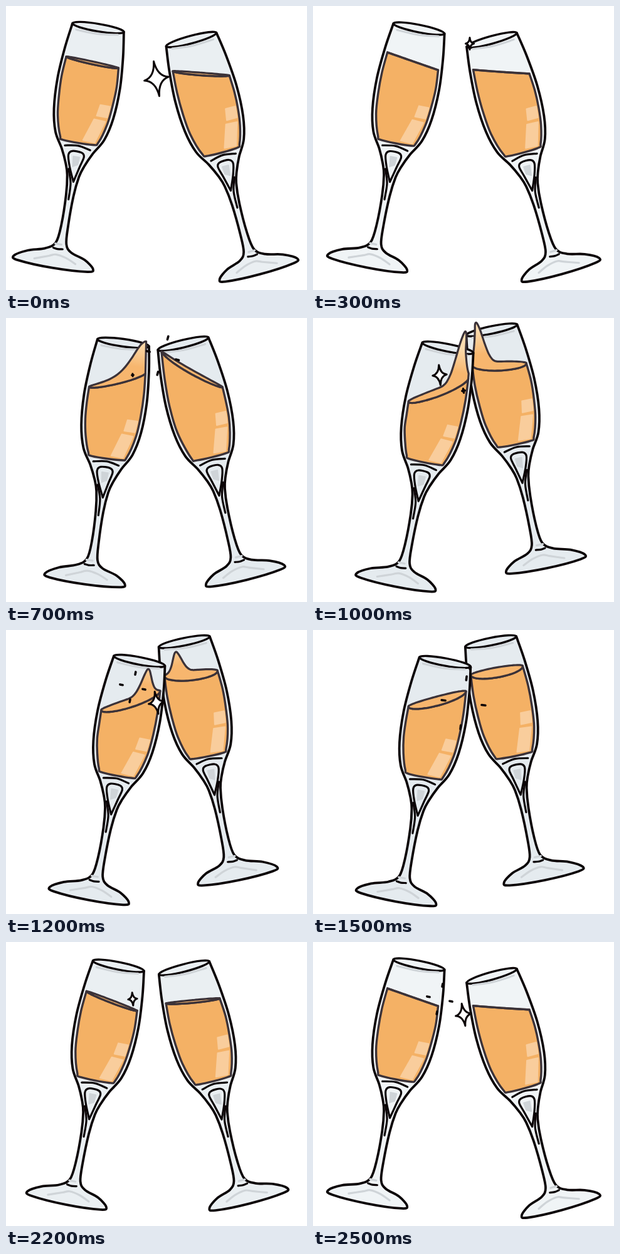
Write an HTML page with a canvas that moves like this. It is 480 px wide and 453 px high and loops after 2600 ms.

```html
<!DOCTYPE html>
<html lang="en">
<head>
<meta charset="utf-8">
<title>Cheers</title>
<style>
html, body { margin: 0; width: 100%; height: 100%; overflow: hidden; background: #fff; }
canvas { display: block; width: 480px; height: 453px; }
</style>
</head>
<body>
<canvas id="stage" width="480" height="453"></canvas>
<script>
const ctx = document.getElementById('stage').getContext('2d');
const LOOP = 2600, HOLD = 200, TICK = 100;
const INK = '#0b0406', EDGE = '#3b3238', GREY = '#cfd4d8';
const ORANGE = '#f4b165', FOAM = '#f7b66e', PALE = '#fbdcb0', SHINE = '#f9cd9c';

const mix = (a, b, u) => a + (b - a) * u;
const clamp = (v, lo = 0, hi = 1) => Math.min(hi, Math.max(lo, v));

// One glass serves both sides: rim centre at 0,0, stem along +y,
// +x towards the other glass. Key points of the profile: [y, half width].
const PROFILE = [[0, 41.5], [40, 47], [90, 50.5], [139, 48], [175, 39.5], [200, 25], [222, 15],
  [240, 9.5], [272, 6], [320, 5.5], [349, 8.5], [361, 21], [369, 46], [381, 64], [387, 56]];
const FLOOR = 186, INSET = 5.5;

function halfWidth(y) {
  const i = clamp(PROFILE.findIndex(p => p[0] > y), 1, PROFILE.length - 1);
  const [a, b] = [PROFILE[i - 1], PROFILE[i]];
  return mix(a[1], b[1], clamp((y - a[0]) / (b[0] - a[0])));
}

// Poses: rim x, rim y, lean in degrees, liquid level, liquid tilt, splash height.
const BEATS = [0, 1, 3, 5, 7, 9, 12];
const glasses = [
  { side: -1, poses: [
    [295.5, 53.5, 15.1, 56, 15, 0], [285, 54, 15.5, 53, 15, 0], [282.5, 41, 13.8, 43, 39, 0],
    [285, 19, 11.8, 56, 7, 65], [283.5, 18.5, 11.5, 47, 1, 0], [282, 16, 12.2, 57, -10, 0]] },
  { side: 1, poses: [
    [147, 34.5, 9.6, 56, -2, 0], [169, 36, 11.2, 53, -6, 0], [187, 39.5, 8, 60, 17, 50],
    [215, 47.5, 11.3, 69, 27, 80], [210.5, 51, 10.5, 60, 20, 0], [200, 42, 11.4, 65, -10, 0]] }
];
for (const g of glasses) g.poses.push(g.poses[1]);

function poseAt(g, n) {
  const i = clamp(BEATS.findIndex(b => b > n), 1, BEATS.length - 1) || 1;
  const last = n >= BEATS[BEATS.length - 1] ? BEATS.length - 1 : i;
  const u = (n - BEATS[last - 1]) / (BEATS[last] - BEATS[last - 1]);
  return g.poses[last - 1].map((v, k) => mix(v, g.poses[last][k], u));
}

// Smooth curve through points, continuing the current path when joined.
function trace(p, joined) {
  if (joined) ctx.lineTo(...p[0]); else ctx.moveTo(...p[0]);
  for (let i = 0; i < p.length - 1; i++) {
    const a = p[i - 1] || p[i], b = p[i], c = p[i + 1], d = p[i + 2] || c;
    ctx.bezierCurveTo(b[0] + (c[0] - a[0]) / 6, b[1] + (c[1] - a[1]) / 6,
      c[0] - (d[0] - b[0]) / 6, c[1] - (d[1] - b[1]) / 6, c[0], c[1]);
  }
}

function paint(fill, stroke, width) {
  if (fill) { ctx.fillStyle = fill; ctx.fill(); }
  if (stroke) { ctx.strokeStyle = stroke; ctx.lineWidth = width; ctx.stroke(); }
}

function line(color, ...p) {
  ctx.beginPath(); trace(p); paint(null, color, 3.2);
}

function block(fill, ...p) {
  ctx.beginPath(); p.forEach(q => ctx.lineTo(...q)); ctx.closePath();
  paint(fill, fill, 2);
}

function drawBody(tint) {
  // the foot sits a little off the stem
  const wall = dir => PROFILE.map(([y, w]) => [dir * w - 8 * clamp((y - 345) / 35), y]);
  ctx.beginPath();
  trace([...wall(-1), [-8, 390], ...wall(1).reverse()]);
  paint(tint, INK, 3.8);
  ctx.beginPath(); ctx.ellipse(0, 0, 41.5, 6, 0, 0, 7); paint(tint, INK, 3.4);

  line(GREY, [-34, 9], [0, 10], [33, 6]);
  line(GREY, [-10, 351], [0, 351]);
  line(GREY, [-39, 380], [-17, 372], [-6, 368], [11, 371], [27, 378]);
  block(GREY, [-5, 209], [5, 209], [4, 221], [-3, 225]);
  line(INK, [-21, 194], [0, 191], [20, 195]);
  line(INK, [2, 249], [-8, 226], [-13, 208], [-8, 201], [7, 201], [12, 207], [8, 224], [2, 249]);
  line(INK, [-9, 230], [-2, 252], [-1, 278]);
  line(INK, [-12, 358], [-5, 359], [3, 358]);
}

function drawLiquid(n, wave, level, tilt, splash) {
  // the splash starts wide at the inner wall, then narrows and moves away from it
  const peak = clamp(1 - 0.19 * (n - 3), 0.4, 1), width = clamp(0.75 - 0.25 * (n - 3), 0.25, 0.75);
  const edge = bend => Array.from({ length: 31 }, (_, i) => {
    const s = -Math.cos(i / 30 * Math.PI), y = level - tilt * s + bend(s);
    return [s * (halfWidth(Math.max(y, 0)) - INSET), y];
  });
  const bow = s => 16 * wave * Math.sqrt(1 - s * s);
  const front = edge(s => 0.7 * bow(s)).reverse();
  const back = edge(s => -0.3 * bow(s) - splash * Math.exp(-(((s - peak) / width) ** 2)));

  const wall = (dir, top) => [0, 0.25, 0.5, 0.75, 1].map(u => {
    const y = mix(top, FLOOR - 6, u);
    return [dir * (halfWidth(y) - INSET), y];
  });
  ctx.beginPath();
  trace([...wall(-1, level + tilt), [-24, FLOOR], [22, FLOOR], ...wall(1, level - tilt).reverse()]);
  trace(front, true);
  ctx.closePath(); paint(ORANGE, EDGE, 3.4);

  const foam = ctx.createLinearGradient(0, 35, 0, -5);
  foam.addColorStop(0, FOAM);
  foam.addColorStop(1, PALE);
  ctx.beginPath();
  trace(back); trace(front, true);
  ctx.closePath(); paint(foam, EDGE, 3.2);
}

function drawGlass(g, n) {
  const [x, y, lean, level, tilt, splash] = poseAt(g, n);
  const wave = Math.abs(Math.sin(Math.PI * (n - 1) / 11)), shade = clamp(2 * wave);
  const tint = `rgb(${mix(240, 229, shade)}, ${mix(244, 235, shade)}, ${mix(246, 239, shade)})`;
  ctx.save();
  ctx.translate(x, y);
  ctx.rotate(g.side * lean * Math.PI / 180);
  ctx.scale(g.side, 1);
  drawBody(tint);
  drawLiquid(n, wave, level, tilt, splash);
  ctx.scale(g.side, 1); // light always falls from the right
  block(SHINE, [24, 121], [40, 121], [38, 139], [21, 139]);
  block(SHINE, [18, 145], [36, 146], [25, 182], [6, 181]);
  ctx.restore();
}

// Sparkles: born as a speck, grow to a star, then burst into four dashes.
const CYCLE = 13;
const sparks = [
  { x: 240, y: 116, born: 10, size: 28, lean: -0.16 },
  { x: 250, y: 60, born: 2, size: 21, lean: 0 },
  { x: 202, y: 91, born: 7, size: 16, lean: -0.08 }
];

function drawSpark({ x, y, born, size, lean }, tick) {
  const age = (tick - born + CYCLE) % CYCLE;
  if (age > 5) return;
  ctx.save();
  ctx.translate(x, y);
  ctx.rotate(age > 3 ? lean + 0.28 : lean);
  ctx.beginPath();
  if (age < 4) {
    const h = size * [0.13, 0.45, 0.64, 1][age], w = 0.7 * h, q = 0.12;
    ctx.moveTo(0, -h);
    for (const [a, b] of [[1, -1], [1, 1], [-1, 1], [-1, -1]]) {
      const end = a * b < 0 ? [a * w, 0] : [0, b * h];
      ctx.quadraticCurveTo(a * w * q, b * h * q, ...end);
    }
    ctx.closePath(); paint('#fff', INK, 3);
  } else {
    const reach = size * (age === 4 ? 1 : 1.4), half = 1 + size / 14;
    for (const [a, b] of [[0, -1], [1, 0], [0, 1], [-1, 0]]) {
      const px = a * reach * 0.82, py = b * reach;
      ctx.moveTo(px - a * half, py - b * half);
      ctx.lineTo(px + a * half, py + b * half);
    }
    paint(null, INK, 3.6);
  }
  ctx.restore();
}

function draw(ms) {
  const t = ms % LOOP, n = Math.floor(t / HOLD), tick = Math.floor(t / TICK) % CYCLE;
  ctx.lineCap = ctx.lineJoin = 'round';
  ctx.fillStyle = '#fff';
  ctx.fillRect(0, 0, 480, 453);
  glasses.forEach(g => drawGlass(g, n));
  sparks.forEach(s => drawSpark(s, tick));
}

const start = performance.now();
function loop() {
  draw(performance.now() - start);
  requestAnimationFrame(loop);
}
loop();
</script>
</body>
</html>
```
